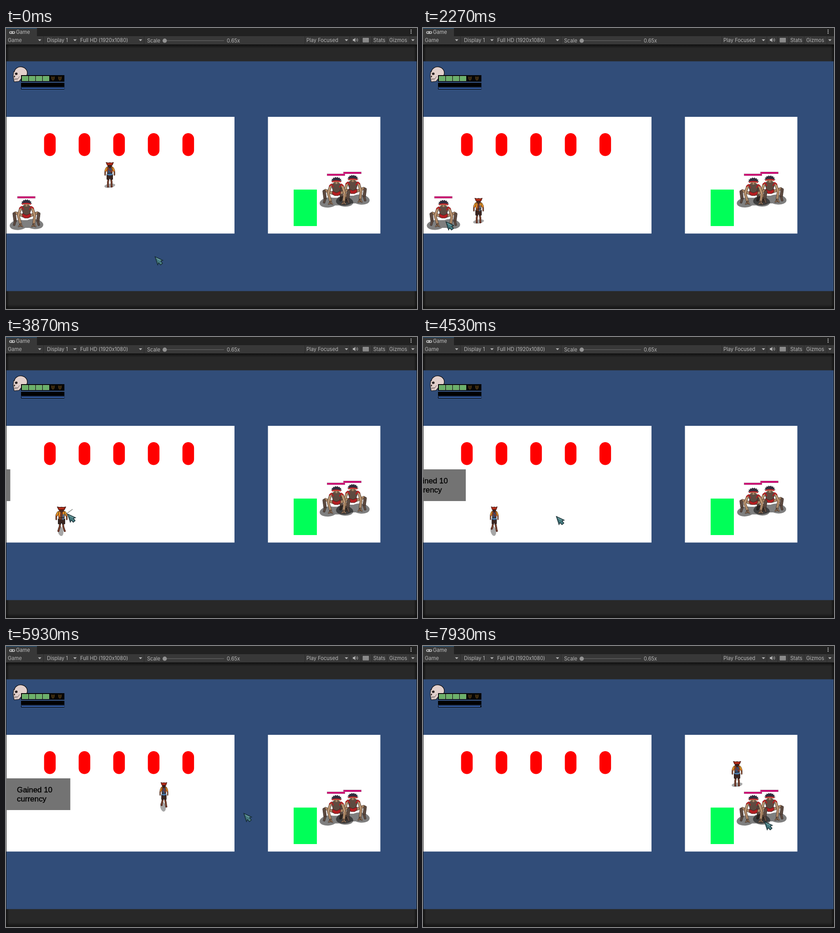
Write an HTML page with a canvas that moves like this. It is 903x620 px and loops after 8000 ms.

```html
<!DOCTYPE html>
<html lang="en">
<head>
<meta charset="utf-8">
<title>Game view</title>
<style>
html, body { margin: 0; width: 100%; height: 100%; overflow: hidden; background: #282828; }
canvas { display: block; }
</style>
</head>
<body>
<canvas id="stage" width="903" height="620"></canvas>
<script>
const ctx = document.getElementById('stage').getContext('2d');
const LOOP = 8000;
const INK = '#241c1c', GREY = '#b6b6b6';
const SIDES = [-1, 1];

// Walking: steady pace, only the turns are given as [time, x, y]
const heroPath = [
  [450, 228, 296], [1000, 214, 316], [1250, 214, 316], [2170, 122, 375], [4270, 122, 374],
  [4860, 200, 374], [6070, 366, 291], [6850, 468, 291], [7100, 590, 291], [7900, 690, 254]
];
const cursorPath = [
  [0, 327, 504], [1000, 180, 406], [2270, 50, 427], [3870, 135, 390],
  [5200, 453, 401], [6730, 601, 332], [7930, 750, 387]
];
const attacks = [1000, 3870];

const clamp = v => Math.min(1, Math.max(0, v));
const smooth = p => p * p * (3 - 2 * p);

function along(path, t, ease = p => p) {
  const i = path.findIndex(k => k[0] > t);
  if (i < 0) return path[path.length - 1].slice(1);
  if (i === 0) return path[0].slice(1);
  const [t0, x0, y0] = path[i - 1], [t1, x1, y1] = path[i];
  const p = ease((t - t0) / (t1 - t0));
  return [x0 + (x1 - x0) * p, y0 + (y1 - y0) * p];
}

function at(x, y, paint) {
  ctx.save();
  ctx.translate(x, y);
  paint();
  ctx.restore();
}

function rect(x, y, w, h, color) {
  ctx.fillStyle = color;
  ctx.fillRect(x, y, w, h);
}

function ellipse(x, y, rx, ry, color, turn = 0) {
  ctx.beginPath();
  ctx.ellipse(x, y, rx, ry, turn, 0, 7);
  ctx.fillStyle = color;
  ctx.fill();
}

function trace(pts) {
  ctx.beginPath();
  for (const [x, y] of pts) ctx.lineTo(x, y);
}

function poly(pts, fill, stroke, width = 1) {
  trace(pts);
  ctx.closePath();
  ctx.fillStyle = fill;
  ctx.fill();
  if (!stroke) return;
  ctx.strokeStyle = stroke;
  ctx.lineWidth = width;
  ctx.stroke();
}

// Closes a right-hand outline with its left-hand reflection
const mirror = half => [...half, ...half.map(([x, y]) => [-x, y]).reverse()];

function line(pts, color, width) {
  trace(pts);
  ctx.strokeStyle = color;
  ctx.lineWidth = width;
  ctx.stroke();
}

function limb(pts, color, width) {
  line(pts, INK, width + 1);
  line(pts, color, width);
}

function label(text, x, y, color = GREY) {
  ctx.fillStyle = color;
  ctx.fillText(text, x, y);
}

function fade(x, y, w, h, x0, y0, x1, y1) {
  const g = ctx.createLinearGradient(x0, y0, x1, y1);
  g.addColorStop(0, 'rgba(0,0,0,.55)');
  g.addColorStop(1, 'rgba(0,0,0,0)');
  rect(x, y, w, h, g);
}

function drawWindow() {
  rect(0, 0, 903, 620, '#282828');
  rect(0, 0, 903, 18, '#212121');
  rect(0, 0, 68, 18, '#383838');
  rect(0, 0, 68, 1.5, '#244d6e');
  rect(0, 18, 903, 18, '#383838');
  for (const x of [82, 158, 303, 656, 755, 779, 803, 837, 887]) rect(x, 18, 1, 18, '#2a2a2a');
  rect(0, 36, 903, 1.5, '#1b1b1b');

  // Gamepad and menu dots
  ctx.lineCap = 'round';
  line([[10, 10], [17, 10]], GREY, 6);
  for (const s of SIDES) ellipse(13.5 + s * 3.2, 9.8, 1.5, 1.5, '#383838');
  for (const s of [-1, 0, 1]) ellipse(890, 8 + s * 3.5, 1.2, 1.2, GREY);

  ctx.font = '11.1px Inter, sans-serif';
  label('Game', 22, 13, '#c2c2c2');
  const items = {
    'Game': 4, 'Display 1': 90, 'Full HD (1920x1080)': 163, 'Play Focused': 660,
    'Stats': 807, 'Gizmos': 842
  };
  for (const text in items) label(text, items[text], 31);
  label('Scale', 310, 32);
  label('0.65x', 485, 32);
  for (const x of [74, 151.5, 295.5, 748, 894])
    at(x, 25, () => poly(mirror([[3.7, 0], [0, 4]]), GREY));

  rect(349, 27, 130, 1.5, '#5c5c5c');
  ellipse(348.7, 28, 4.7, 4.7, '#929292');

  // Speaker and keyboard
  rect(762, 24.5, 3, 4, GREY);
  poly([[763, 26.5], [767.5, 21.5], [767.5, 31.5]], GREY);
  ctx.strokeStyle = GREY;
  ctx.lineWidth = 1;
  for (const r of [2.5, 5]) {
    ctx.beginPath();
    ctx.arc(768, 26.5, r, -.9, .9);
    ctx.stroke();
  }
  rect(784, 22, 13, 9.5, GREY);
  for (let i = 0; i < 12; i++)
    rect(785.2 + i % 4 * 3, 23.2 + (i >> 2) * 2.8, 1.8, 1.6, '#383838');

  fade(0, 37, 903, 8, 0, 37, 0, 45);
  fade(0, 610, 903, 10, 0, 620, 0, 610);
  fade(0, 37, 7, 583, 0, 0, 7, 0);
  fade(896, 37, 7, 583, 903, 0, 896, 0);
  rect(0, 618, 903, 2, '#161616');
}

function drawRoom() {
  rect(1, 73.5, 901, 507, '#314d79');
  rect(1, 196, 501, 257.5, '#fff');
  rect(575.5, 196, 247, 257.5, '#fff');
  for (let i = 0; i < 5; i++) {
    const x = 96.4 + i * 76;
    line([[x, 244.7], [x, 269.7]], '#f00', 25.5);
  }
  rect(632, 356.5, 51, 80.5, '#00ff58');
}

function drawSkull() {
  const bone = '#e2d0cc';
  const jaw = [[-14, -4], [-15, 6], [-13, 17], [-3, 16], [4, 7]];
  ctx.lineJoin = 'round';
  // Dark contour first, bone on top
  for (const [color, grow] of [['#0d0b0d', .7], [bone, -.6]]) {
    ellipse(1, -2, 14.3 + grow, 13.3 + grow, color, .15);
    poly(jaw, color, color, Math.max(.1, 1 + grow));
    if (color !== bone) line([...jaw, jaw[0]], color, 2.4);
  }
  ellipse(-9, 0, 3, 2.6, '#2b2222', -.2);
  ellipse(-13, 6, 1.3, 2, '#2b2222', .3);
  line([[-13, 12], [-5, 11], [-2, 6]], '#4a3c3c', .8);
  for (let x = -12; x < -5; x += 2.5) line([[x, 10], [x, 14]], '#6d5c5a', .6);
}

function drawHud(t) {
  at(31.5, 101, drawSkull);
  rect(33, 104, 95.3, 14.5, '#060606');
  for (let i = 0; i < 6; i++) {
    const x = 35 + i * 15.3;
    if (i < 4) {
      rect(x, 106, 14, 11, '#8cc088');
      rect(x + .8, 106.8, 12.4, 9.4, '#6bb069');
    } else at(x + 7, 112, () => {
      poly(mirror([[0, -4], [4, -5], [3.3, 1], [0, 4.5]]), '#4a3513');
      rect(-2, -2.5, 4, 1, '#16100a');
      rect(-.5, -2, 1, 4, '#16100a');
    });
  }
  rect(33, 121, 95.3, 14.3, '#020203');
  rect(33, 130, 95.3, 1, '#29436d');
  const used = t < 6860 ? 0 : 15 - 13 * clamp((t - 6860) / 1070);
  rect(34, 132, 94 - used, 1.8, '#4b86ee');
}

// Crouching brute; dip lowers the upper body while hands and feet stay
function drawBrute(x, y, dip) {
  const skin = '#ac8766', vest = '#5d4a40', red = '#b31f22';
  const k = 1 - dip * .0075, top = -52 + dip;
  at(x, y, () => {
    ctx.lineCap = ctx.lineJoin = 'round';
    ctx.beginPath();
    for (const s of SIDES)
      ctx.ellipse(s * 17 * k, -11.5 - s, 20 * k, 11 * k, s * .12, 0, 7);
    ctx.rect(-15, -21, 30, 17);
    ctx.fillStyle = 'rgba(0,0,0,.5)';
    ctx.fill();

    for (const s of SIDES) {
      const knee = -37 + dip * .6;
      limb([[s * 6, -30 + dip * .3], [s * 24, knee]], skin, 5.5);
      limb([[s * 27, knee + 2], [s * 25, -20]], vest, 6);
      limb([[s * 25, -18], [s * 27, -11]], vest, 4);
    }
    poly(mirror([[0, -36], [9, -36], [9, -29], [4, -25.5]]), red, INK, .7);
    poly(mirror([[0, top], [9, top], [10, top + 8], [7, -35 + dip * .4], [0, -32 + dip * .3]]), vest, INK, .7);

    for (const s of SIDES) {
      const elbow = [s * (18 + dip * .35), -31 + dip * .6], hand = s * 14.5 + 1.5;
      limb([[s * 13, top + 5], elbow, [hand, -13]], skin, 5);
      line([[s * 13, top + 5], elbow], '#bd9874', 2.5);
      for (let i = -2; i < 3; i++)
        limb([[hand, -13], [hand + i * 2.2, -8 + Math.abs(i) * .6]], skin, 1.4);
      line([[s * 7, top + 7], [s * 11, top + 1], [s * 15, top + 5]], red, 2.6);
    }

    // Head: spiky hair, headband, beard
    ctx.translate(0, dip);
    ellipse(0, -54, 7, 6, skin);
    poly(mirror([[0, -51], [7, -54], [5, -46], [0, -43]]), '#604b41');
    for (const s of SIDES) ellipse(s * 3, -54, 1.6, 1, '#4a3933');
    const hair = Array.from({ length: 15 }, (_, i) => {
      const a = Math.PI * (1 + i / 14), r = i % 2 ? 8.5 : 11;
      return [Math.cos(a) * r * 1.05, -58 + Math.sin(a) * r * .8];
    });
    poly(hair, '#302d3d', '#211e29', .7);
    ctx.beginPath();
    ctx.ellipse(0, -56, 9, 2, 0, Math.PI, 0);
    ctx.strokeStyle = '#c62326';
    ctx.lineWidth = 2.4;
    ctx.stroke();
  });
}

function drawBar(x, y) {
  rect(x, y, 40, 4.8, '#a28a99');
  rect(x + .7, y + .7, 38.6, 3.5, '#d00070');
}

function heroState(t) {
  const [x, y] = along(heroPath, t);
  const [bx, by] = along(heroPath, t - 30);
  const walking = Math.hypot(x - bx, y - by) > .3;
  const facingUs = t > heroPath[0][0] && t < heroPath[4][0];
  return { x, y, walking, facingUs, attack: attacks.some(a => Math.abs(t - a) < 150) };
}

function drawHero(t) {
  const { x, y, walking, facingUs, attack } = heroState(t);
  const step = walking ? Math.sin(t / 95) : 0;
  const w = attack ? 1.05 : walking ? .75 : .92;
  const skin = '#85492f';
  at(x, y, () => {
    ctx.lineCap = ctx.lineJoin = 'round';
    const shade = 'rgba(70,70,70,.48)';
    if (walking || attack) ellipse(-2, 54, 6, 11, shade, -.2);
    else ellipse(0, 52, 12, 4.5, shade, -.15);

    for (const s of SIDES) {
      const foot = [s * (attack ? 7 : 4) - step * s * 3, 54 - 9 * Math.max(0, s * step)];
      limb([[s * 3 * w, 36], [s * 4, 45], foot], '#7a412c', 3);
      line([foot, [foot[0] + 1.5, foot[1]]], '#67291f', 2);
    }

    ctx.scale(w, 1);
    poly(mirror([[0, 27], [7, 27], [7, 38], [2, 39], [0, 35]]), '#3a251f', INK);
    for (const s of SIDES) {
      limb([[s * 9, 15], [s * 11, 22], [s * 11, 28]], skin, 2.4);
      limb([[s * 7, 13], [s * 10, 19]], '#d9751d', 4);
      line([[s * 7, 12], [s * 9, 17]], '#efb52c', 2);
    }
    poly(mirror([[0, 10], [6, 10], [7, 18], [5, 28], [0, 28]]), '#c95a1c', INK, .8);
    if (facingUs) {
      poly(mirror([[0, 12], [2, 11], [3, 27], [0, 29]]), '#6b3a28');
      for (const s of SIDES) line([[s * 4, 12], [s * 5, 20]], '#e8a52a', 2);
      line([[4, 18], [3, 28]], '#456f99', 3);
    } else {
      poly(mirror([[0, 13], [4, 13], [5, 28], [0, 31]]), '#344f75', INK, .6);
      line([[-4, 14], [4, 22]], '#8a2f1e', 2);
      line([[-5, 27], [5, 27]], '#4c79a7', 3.5);
    }
    line([[-6, 25], [6, 24]], '#231d1d', 1.3);
    ellipse(0, 8.5, 5.2, 4.5, facingUs ? '#4c2b20' : '#39211b');
    poly(mirror([[0, 1], [4, 1.5], [9, .5], [6, 7]]), '#9e2415', '#38120d');
    line([[-5, 4], [4, 3.5]], '#cb3b1d', 1.6);
    if (attack) line([[6, 19], [23, 6]], '#555b56', 1);
  });
}

function drawPanel(t) {
  const shown = clamp(Math.min(t - 3800, 7900 - t) / 1100);
  if (!shown) return;
  at((shown - 1) * 141, 292, () => {
    rect(0, 0, 141.3, 70, '#737373');
    ctx.font = '16.9px "Liberation Sans", Arial, sans-serif';
    ctx.strokeStyle = '#000';
    ctx.lineWidth = .4;
    ['Gained 10', 'currency'].forEach((text, i) => {
      label(text, 24, 31 + i * 20, '#000');
      ctx.strokeText(text, 24, 31 + i * 20);
    });
  });
}

function drawCursor(t) {
  const [x, y] = along(cursorPath, t, smooth);
  at(x, y, () => {
    ctx.rotate(-.72);
    ctx.lineJoin = 'miter';
    poly(mirror([[0, .7], [7.5, 18], [3, 16], [2.7, 22.5]]), '#50868a', '#142a30', 1.4);
    for (const s of SIDES) line([[0, 5], [s * 4, 15]], s < 0 ? '#315f66' : '#79a7a6', 1.2);
    line([[0, 12], [0, 19]], '#315f66', 1);
  });
}

function draw(t) {
  const dip = 3.5 * (1 - Math.cos(t / 1000 * Math.PI));
  drawWindow();
  drawRoom();
  drawBrute(762, 391, dip);
  drawBrute(726, 395.5, dip);
  drawBar(705, 321.4);
  drawBar(741, 317.2);
  if (t < 3780) {
    drawBrute(45, 445, dip);
    drawBar(24.7, 371.2);
  }
  drawHero(t);
  drawPanel(t);
  drawHud(t);
  drawCursor(t);
}

const start = performance.now();
function tick(now) {
  draw(Math.max(0, now - start) % LOOP);
  requestAnimationFrame(tick);
}
draw(0);
requestAnimationFrame(tick);
</script>
</body>
</html>
```
